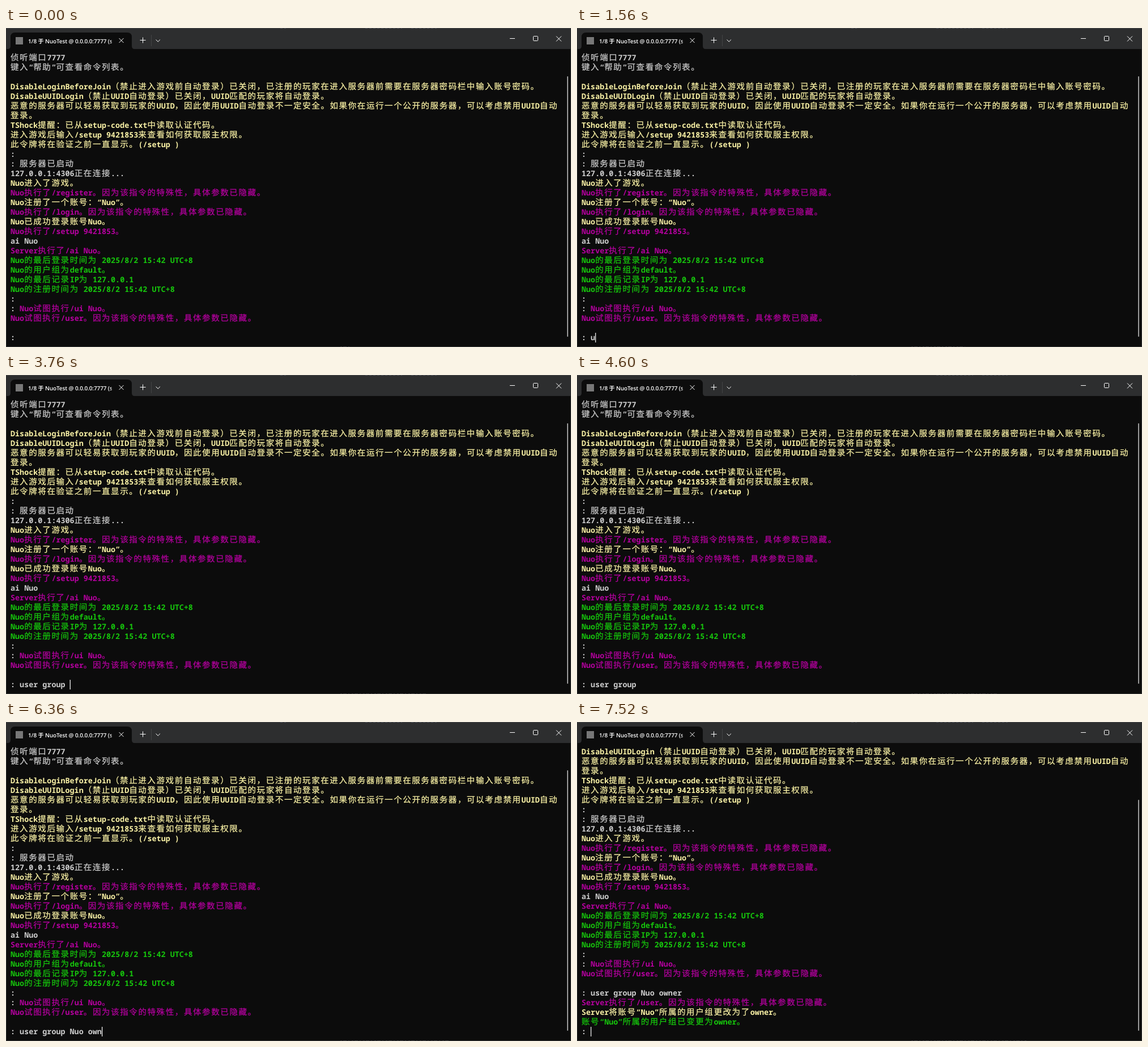
An HTML page for the animation above (8 s loop, 997 px wide and 562 px high).

```html
<!DOCTYPE html>
<html lang="zh-CN">
<head>
<meta charset="utf-8">
<title>Terminal</title>
<style>
html, body { margin: 0; height: 100%; overflow: hidden; background: #0c0c0c; }
svg { display: block; }
text { white-space: pre; text-rendering: geometricPrecision; text-spacing-trim: space-all; }
.row { font: 600 13.42px "Noto Sans Mono", "DejaVu Sans Mono", monospace; }
.cjk { font: 400 14.5px "Noto Sans CJK SC", "Noto Sans CJK", sans-serif; letter-spacing: 1.6px; stroke-width: .25px; }
.title { font: 600 10px "Open Sans", "Noto Sans CJK SC", sans-serif; letter-spacing: -.1px; fill: #fff; }
.line { fill: none; stroke: #fff; }
</style>
</head>
<body>
<svg id="stage" width="100%" height="100%" viewBox="0 0 997 562">
  <rect width="997" height="562" fill="#0c0c0c"/>
  <rect width="997" height="37" fill="#2d2e2f"/>
  <path d="M0 .5H997" stroke="#454647"/>
  <path d="M484 .5h10M634 .5h65M715 .5h45" stroke="#5a5e66" stroke-dasharray="4 3"/>
  <path d="M.5 1V562M996.5 1V562M0 561.5H997" stroke="#2f3031"/>
  <path d="M3 37q5 0 5-5V16q0-8 8-8H214q8 0 8 8V32q0 5 5 5z" fill="#0c0c0c"/>
  <rect x="17" y="16" width="13" height="13" fill="#777"/>
  <svg x="39" y="8" width="147.5" height="29"><text class="title" id="title" y="18.5"></text></svg>
  <path class="line" d="M199.5 18l8 8m0-8l-8 8M236.5 21.5h10m-5-5v10M264.5 20.5l3.7 3.7 3.7-3.7M889 18.5h9M971 14.5l9 9m0-9l-9 9"/>
  <rect class="line" x="930.5" y="14.5" width="8" height="8" rx="1"/>
  <path d="M256.5 12V32" stroke="#434445"/>
  <svg y="44" width="997" height="518">
    <g id="screen"><g id="log"></g><g id="reply"></g></g>
  </svg>
  <rect id="caret" y="537" width="1.2" height="17" fill="#fff"/>
  <rect id="bar" x="990" width="2" rx="1" fill="#9b9b9b"/>
  <path id="under" stroke="#4a4b4d" stroke-dasharray="3 2 6 3 2 4"/>
  <path id="mouse" d="M0 0V13.5L3.2 10.6 5.3 15.3 7.5 14.3 5.5 9.8H9.7z" fill="#fff" stroke="#000" stroke-width=".7"/>
</svg>
<script>
const $ = id => document.getElementById(id);
const NS = "http://www.w3.org/2000/svg";
const CELL = 8.05, ROW = 17, LOOP = 8000, ENTER = 7520;
const user = "Nuo", hidden = "因为该指令的特殊性，具体参数已隐藏。";
const command = `user group ${user} owner`;
const colors = { w: "#ccc", y: "#f9f1a5", p: "#b4009e", g: "#16c60c" };

// Each segment starts with its colour letter; "|" separates segments.
const log = [
  "w侦听端口7777",
  "w键入“帮助”可查看命令列表。",
  "w",
  "yDisableLoginBeforeJoin（禁止进入游戏前自动登录）已关闭，已注册的玩家在进入服务器前需要在服务器密码栏中输入账号密码。",
  "yDisableUUIDLogin（禁止UUID自动登录）已关闭，UUID匹配的玩家将自动登录。",
  "y恶意的服务器可以轻易获取到玩家的UUID，因此使用UUID自动登录不一定安全。如果你在运行一个公开的服务器，可以考虑禁用UUID自动",
  "y登录。",
  "yTShock提醒：已从setup-code.txt中读取认证代码。",
  "y进入游戏后输入/setup 9421853来查看如何获取服主权限。",
  "y此令牌将在验证之前一直显示。(/setup )",
  "w:",
  "w: 服务器已启动",
  "w127.0.0.1:4306正在连接...",
  `y${user}进入了游戏。`,
  `p${user}执行了/register。${hidden}`,
  `y${user}注册了一个账号：“${user}”。`,
  `p${user}执行了/login。${hidden}`,
  `y${user}已成功登录账号${user}。`,
  `p${user}执行了/setup 9421853。`,
  `wai ${user}`,
  `pServer执行了/ai ${user}。`,
  `g${user}的最后登录时间为 2025/8/2 15:42 UTC+8`,
  `g${user}的用户组为default。`,
  `g${user}的最后记录IP为 127.0.0.1`,
  `g${user}的注册时间为 2025/8/2 15:42 UTC+8`,
  "w:",
  `w: |p${user}试图执行/ui ${user}。`,
  `p${user}试图执行/user。${hidden}`,
  "w",
  "w: "
];
const reply = [
  `pServer执行了/user。${hidden}`,
  `yServer将账号“${user}”所属的用户组更改为了owner。`,
  `g账号“${user}”所属的用户组已变更为owner。`,
  "w: "
];

// Time at which each character of the command is typed.
const keys = [1400, 1600, 1800, 1960, 2160, 2440, 2520, 2760, 3000, 3360,
  3640, 4880, 5160, 5280, 5520, 5800, 6040, 6360, 6640, 7000];
const caretOff = [[0, 440], [920, 1400], [4440, 4720]];
// Pointer path: time, x, y.
const path = [[160, 236, 566], [440, 214, 541], [600, 214, 541], [680, 222, 546], [760, 230, 564]];

function add(parent, tag, attrs, text = "") {
  const el = document.createElementNS(NS, tag);
  for (const k in attrs) el.setAttribute(k, attrs[k]);
  el.textContent = text;
  return parent.appendChild(el);
}

function addRow(parent, line, i) {
  const row = add(parent, "text", { class: "row", x: 8, y: i * ROW + 13 });
  for (const seg of line.split("|")) {
    const fill = colors[seg[0]];
    for (const run of seg.slice(1).match(/[\u3000-\uffff]+|[^\u3000-\uffff]+/g) || [])
      add(row, "tspan", run[0] >= "\u3000" ? { class: "cjk", fill, stroke: fill } : { fill }, run);
  }
  return row;
}

$("title").textContent = `1/8 于 ${user}Test @ 0.0.0.0:7777 (s`;
const rows = log.map((line, i) => addRow($("log"), line, i));
reply.forEach((line, i) => addRow($("reply"), line, i + log.length));
const prompt = rows[rows.length - 1].firstChild;

function pointer(t) {
  const i = path.findIndex(p => p[0] > t);
  if (i < 1) return [0, 600];
  const [a, x, y] = path[i - 1], [b, u, v] = path[i], k = (t - a) / (b - a);
  return [x + (u - x) * k, y + (v - y) * k];
}

function draw(now) {
  const t = now % LOOP, done = t >= ENTER;
  const typed = keys.filter(k => k <= t).length;
  const text = ": " + command.slice(0, typed);
  if (prompt.textContent !== text) prompt.textContent = text;
  $("reply").style.display = done ? "" : "none";
  $("screen").setAttribute("transform", `translate(0 ${done ? -reply.length * ROW : 0})`);
  $("caret").setAttribute("x", 8 + CELL * (done ? 2 : 2 + typed));
  $("caret").style.display = caretOff.some(([a, b]) => t >= a && t < b) ? "none" : "";
  $("bar").setAttribute("y", done ? 137 : 85);
  $("bar").setAttribute("height", done ? 407 : 459);
  $("under").setAttribute("d", `M590 561.5H${t < 920 ? 606 : 679 + 5.7 * typed}`);
  $("mouse").setAttribute("transform", `translate(${pointer(t)})`);
  requestAnimationFrame(draw);
}
requestAnimationFrame(draw);
</script>
</body>
</html>
```
